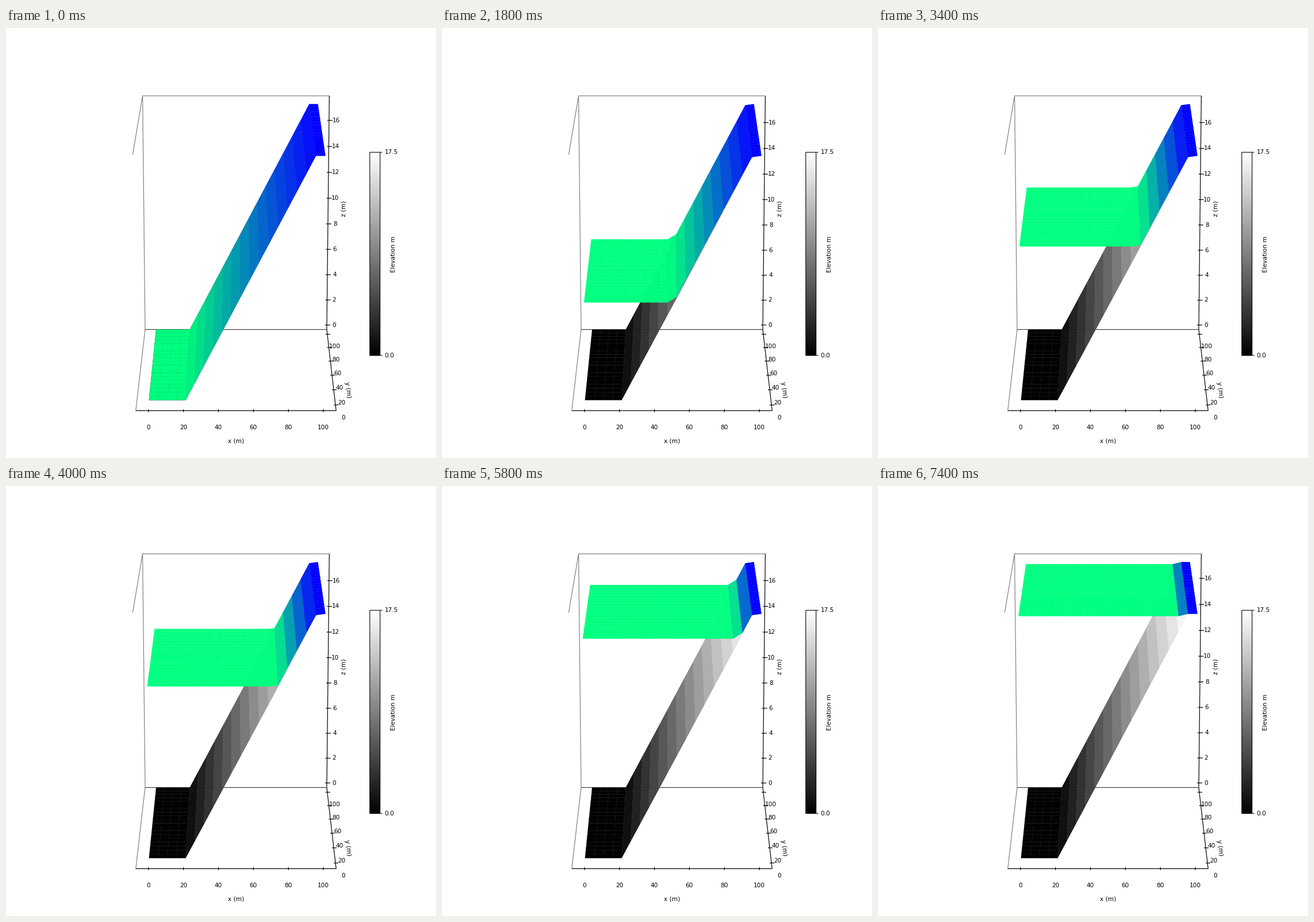
Animation, 748 px wide and 748 px high, one loop 8000 ms. Source, as a matplotlib script:

```python
import numpy as np
import matplotlib.pyplot as plt
from matplotlib.animation import FuncAnimation
from matplotlib.collections import LineCollection, PolyCollection

SIZE, DPI = 748, 64
PT = 72 / DPI          # points per pixel
STEPS = 37             # simulation steps before the final hold
FONT = 10.5 * PT
TOP = 17.5
N = 20

plt.rcParams["font.family"] = "DejaVu Sans"
plt.rcParams["path.snap"] = False
fig = plt.figure(figsize=(SIZE / DPI, SIZE / DPI), dpi=DPI, facecolor="white")
ax = fig.add_axes([0, 0, 1, 1])
ax.axis("off")

nodes = np.linspace(0, 100, N)
bed = TOP * np.clip((np.arange(N) - 4) / 14, 0, 1)
film = np.full(N, 0.09)    # runoff depth on the slope
film[-2:] = 0.1, 0.19

# stored water volume and relative runoff depth against step
VOL_STEP = [0, 1, 4, 13, 20, 26, 32, 33, 35, 37]
VOLUME = [0, 19.4, 110.6, 380, 595, 779, 961, 973, 991, 998]
FILM_STEP = [0, 1, 2, 32, 33, 34, 35, 36, 37]
FILM = [0, 0.8, 1, 1, 0.63, 0.35, 0.17, 0.06, 0]


def frac(value):
    """Position of an x or y value inside the padded box, 0 to 1."""
    return (value + 5 + 110 / 48) / (110 * 25 / 24)


def project(u, v, w):
    """Perspective view of box fractions (across, back, up) in pixels."""
    depth = 0.005739 + 0.00059 * v - 0.000172 * w
    px = 400 + (2 * u - 1) / depth
    py = (3.8199 - 0.5003 * v - 2.5931 * w) / depth
    return np.stack(np.broadcast_arrays(px, py), axis=-1)


def height(z, zmax):
    return 0.02 + 0.96 * z / zmax


def facets(z, zmax):
    u, v = np.meshgrid(frac(nodes), frac(nodes))
    p = project(u, v, height(z, zmax)[None, :])
    quads = np.stack([p[:-1, :-1], p[:-1, 1:], p[1:, 1:], p[1:, :-1]], axis=2)
    return quads.reshape(-1, 4, 2)


def shades(z, cmap):
    mean = (z[:-1] + z[1:]) / 2
    level = (mean - mean.min()) / (mean.max() - mean.min())
    return np.tile(plt.get_cmap(cmap)(level), (N - 1, 1))


def water(step):
    volume = np.interp(step, VOL_STEP, VOLUME)
    level = (np.sqrt(21.05 ** 2 + 8.42 * volume) - 21.05) / 4.21
    return np.maximum(level, bed + film * np.interp(step, FILM_STEP, FILM))


def line(points, color="black", width=1.2):
    xs, ys = zip(*points)
    ax.plot(xs, ys, color=color, lw=width * PT, zorder=1,
            solid_capstyle="butt")


def label(x, y, text, **kw):
    style = dict(ha="center", va="center", fontsize=FONT, zorder=4)
    style.update(kw)
    return ax.text(x, y, text, **style)


def mesh(zorder):
    # a hairline in the face colour softens the seams between cells
    cells = PolyCollection([], linewidths=0.3 * PT, edgecolors="face",
                           antialiaseds=True, zorder=zorder)
    ax.add_collection(cells, autolim=False)
    return cells


def draw_box():
    c = {(u, v, w): project(u, v, w)
         for u in (0, 1) for v in (0, 1) for w in (0, 1)}
    line([c[0, 0, 1], c[0, 1, 1], c[0, 1, 0], c[0, 0, 0]], "0.5")
    line([c[0, 1, 1], c[1, 1, 1]], "0.5")
    line([c[0, 1, 0], c[1, 1, 0]], "0.25")
    line([c[0, 0, 0], c[1, 0, 0], c[1, 1, 0], c[1, 1, 1]])


def draw_ticks():
    for value in range(0, 101, 20):
        x, y = project(frac(value), 0, 0)
        line([(x, y - 2.5), (x, y + 2.5)])
        label(x, 695, str(value))
        x, y = project(1, frac(value), 0)
        line([(x - 3, y), (x + 5, y)])
        k = value / 100
        label(x + 13.6 - 1.1 * k, y + 22.7 - 1.5 * k, str(value))
    label(400, 718.7, "x (m)")
    label(595, 629.7, "y (m)", rotation=-83.4)
    label(587.5, 314.5, "z (m)", rotation=89.4)


def draw_colorbar():
    left, right, top, bottom = 632.8, 650.7, 216.2, 569.7
    ax.imshow(np.linspace(1, 0, 256)[:, None], cmap="gray", vmin=0, vmax=1,
              extent=(left, right, bottom, top), aspect="auto", zorder=1)
    ax.add_patch(plt.Rectangle((left, top), right - left, bottom - top,
                               fill=False, ec="black", lw=1.1 * PT, zorder=2))
    for y, text in ((top, "17.5"), (bottom, "0.0")):
        line([(right, y), (right + 4, y)], width=1)
        label(658.7, y, text, ha="left")
    label(674, 393, "Elevation m", rotation=90)


draw_box()
draw_ticks()
draw_colorbar()
ax.set(xlim=(0, SIZE), ylim=(SIZE, 0))

z_values = range(0, 17, 2)
z_ticks = LineCollection([], colors="black", linewidths=1.2 * PT, zorder=1)
ax.add_collection(z_ticks, autolim=False)
z_labels = [label(0, 0, str(v)) for v in z_values]

bed_mesh = mesh(2)
water_mesh = mesh(3)
bed_mesh.set_facecolor(shades(bed, "gray"))


def update(frame):
    surface = water(min(frame, STEPS))
    zmax = surface.max()
    bed_mesh.set_verts(facets(bed, zmax))
    water_mesh.set_verts(facets(surface, zmax))
    water_mesh.set_facecolor(shades(surface, "winter_r"))
    marks = []
    for value, text in zip(z_values, z_labels):
        x, y = project(1, 1, height(value, zmax))
        marks.append([(x - 3, y), (x + 6, y)])
        text.set_position((x + 12.5, y))
    z_ticks.set_segments(marks)
    return [bed_mesh, water_mesh, z_ticks, *z_labels]


anim = FuncAnimation(fig, update, frames=40, interval=200, repeat=True,
                     repeat_delay=0, blit=False)
plt.show()
```
